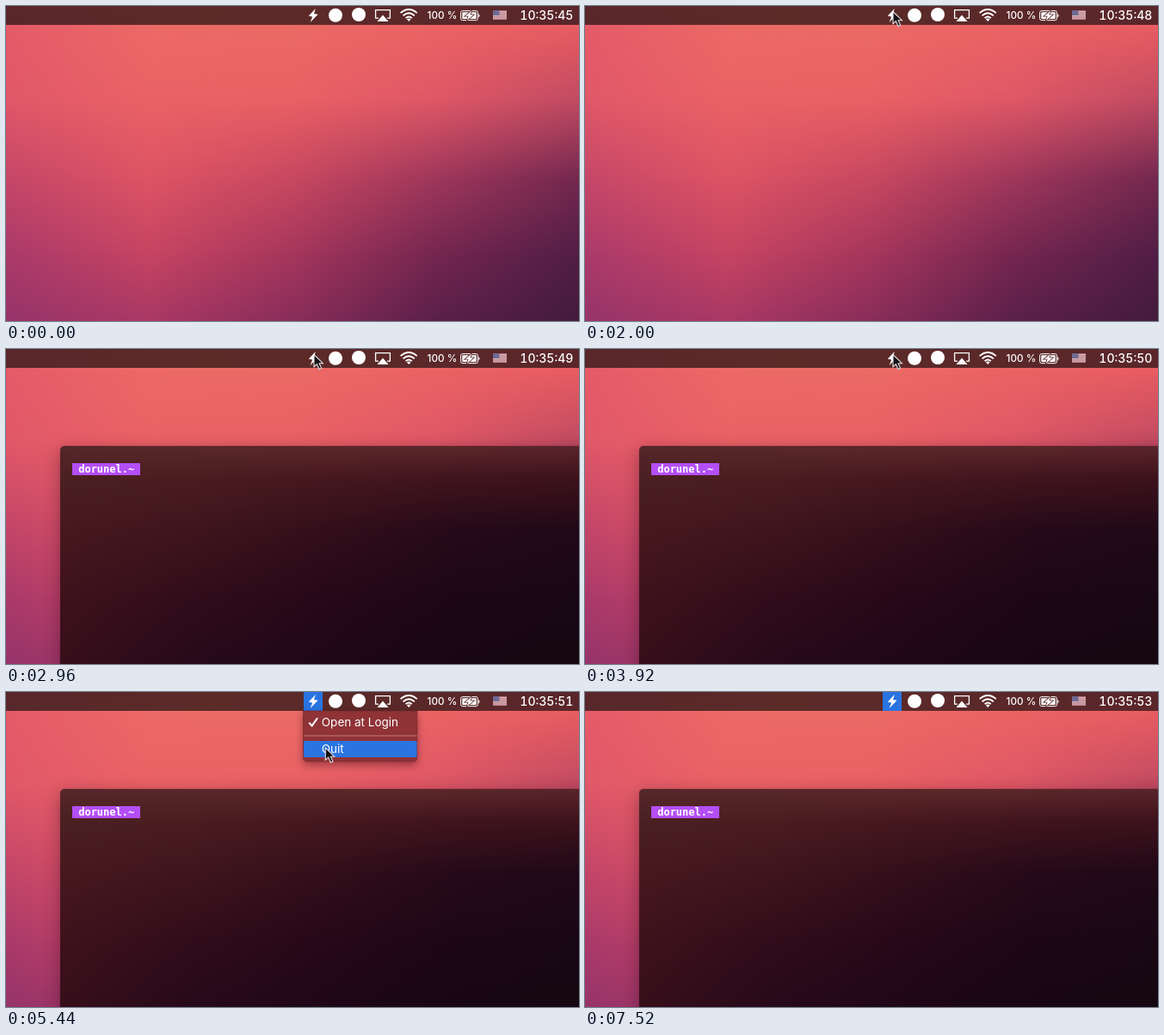
Recreate the animation shown at these times as an HTML page. Size 666 px wide and 367 px high, loop 7.6 s.

```html
<!DOCTYPE html>
<html lang="en">
<head>
<meta charset="utf-8">
<title>Menu bar terminal</title>
<style>
  html, body { margin: 0; width: 100%; height: 100%; overflow: hidden; background: #a83a60; }
  #stage { position: relative; width: 666px; height: 367px; overflow: hidden; }
  #wall, .band, svg { position: absolute; inset: 0; }
  #window {
    position: absolute; left: 63px; top: 113px; right: -14px; bottom: -20px;
    overflow: hidden; border-radius: 5px;
    box-shadow: 0 5px 20px rgba(40, 0, 20, .36), 0 0 1px rgba(0, 0, 0, .5);
  }
  text { font-family: Inter, Roboto, sans-serif; fill: #fff; white-space: pre; }
  .status { font-weight: 500; }
  .prompt { font: bold 12px "DejaVu Sans Mono", monospace; }
  .item { font-size: 13.5px; }
  .line { fill: none; stroke: #fff; }
  .blue { fill: #2a74e2; }
  #panel { filter: drop-shadow(0 4px 5px rgba(40, 0, 10, .4)); }
</style>
</head>
<body>
<div id="stage">
  <div id="wall"></div>
  <div id="window"></div>
  <svg width="666" height="367" viewBox="0 0 666 367">
    <defs>
      <linearGradient id="barFill">
        <stop offset="0" stop-color="#58272b"/>
        <stop offset=".35" stop-color="#5b2b28"/>
        <stop offset="1" stop-color="#5a262a"/>
      </linearGradient>
    </defs>

    <g id="prompt">
      <rect x="77" y="133" width="79" height="14" fill="#b44ef6"/>
      <text class="prompt" x="84.2" y="144">dorunel.~</text>
      <rect id="caret" x="164" y="133" width="7" height="14" fill="#fff"/>
    </g>

    <rect width="666" height="22" fill="url(#barFill)"/>
    <rect id="active" class="blue" x="346" width="22" height="22"/>

    <g fill="#fff">
      <path d="M359.8 3 351.8 11.6 356.2 12.4 353.6 19 362.6 9.8 358 9Z"/>
      <circle cx="383" cy="10.8" r="8"/>
      <circle cx="410" cy="10" r="8"/>
      <path class="line" stroke-width="1.3" d="M433 14.2H429.6V4.6H446.4V14.2H443"/>
      <path d="M438 10.6 444.6 18H431.4Z"/>
      <g class="line" stroke-width="1.9">
        <path d="M458.6 8.1Q468.2 -.3 477.8 8.1"/>
        <path d="M461.6 11.2Q468.2 5.4 474.8 11.2"/>
        <path d="M464.6 14.1Q468.2 11 471.8 14.1"/>
      </g>
      <path d="M468.2 18 465.8 15.3Q468.2 13.5 470.6 15.3Z"/>
      <rect class="line" x="528.6" y="5.6" width="19.8" height="11" rx="2"/>
      <rect x="530.3" y="7.3" width="16.4" height="7.6" rx=".6"/>
      <path d="M549.4 9Q552 11 549.4 13.4Z"/>
      <path stroke="#5a282a" stroke-width="1.6" paint-order="stroke"
        d="M541.2 5.4 533.8 11.8H537.6L535.6 17 543.4 10.2H539.4Z"/>
    </g>
    <g id="flag">
      <rect x="566" y="5" width="16" height="11" fill="#e9e1e4"/>
      <path stroke="#a8525f" stroke-width=".85"
        d="M566 5.5h16m-16 1.7h16m-16 1.7h16m-16 1.7h16m-16 1.7h16m-16 1.7h16m-16 1.3h16"/>
      <rect x="566" y="5" width="7.5" height="6" fill="#6f6a92"/>
    </g>
    <text class="status" x="489.6" y="15" font-size="11.7">100 %</text>
    <text class="status" id="clock" x="659.3" y="16" font-size="14" text-anchor="end"
      style="font-variant-numeric: tabular-nums"></text>

    <g id="menu">
      <path id="panel" fill="#8f3337" stroke="#6c2429" stroke-width=".6"
        d="M345.5 22H477.8V76Q477.8 80.8 473 80.8H350.3Q345.5 80.8 345.5 76Z"/>
      <rect x="346" y="50" width="131.5" height="2" fill="#a9575a"/>
      <rect id="openRow" class="blue" x="346" y="26" width="131.5" height="19"/>
      <rect id="quitRow" class="blue" x="346" y="57" width="131.5" height="19"/>
      <path class="line" stroke-width="2" d="M352.2 35.6 355.6 39.4 362 30.4"/>
      <text class="item" x="366.8" y="40">Open at Login</text>
      <text class="item" x="366.8" y="71">Quit</text>
    </g>

    <path id="pointer" fill="#151015" stroke="#e6e2e3" stroke-width="1.1"
      d="M0 0V14.2L3.4 11.2 6 17 8.6 15.9 6.1 10.2H10.4Z"/>
  </svg>
</div>
<script>
const LOOP = 7600, STEP = 80;
const $ = id => document.getElementById(id);

// Horizontal gradients, each fading into the next one below it.
function softMesh(parent, rows) {
  rows.forEach(([y, colors], i) => {
    const band = document.createElement('div');
    band.className = 'band';
    const stops = colors.split(' ').map(c => '#' + c).join(',');
    band.style.background = `linear-gradient(90deg, ${stops})`;
    if (i) {
      const mask = `linear-gradient(transparent ${rows[i - 1][0]}px, #000 ${y}px)`;
      band.style.webkitMaskImage = band.style.maskImage = mask;
    }
    parent.append(band);
  });
}

softMesh($('wall'), [
  [22, 'e65a68 ec6a67 eb6b66 ec6364 e95d61'],
  [110, 'e05869 ea6265 e96064 de5766 c04a62'],
  [200, 'c64768 dd5464 c84860 9f375b 74284f'],
  [290, 'aa3a6a c64462 a5365c 742650 511e45'],
  [367, '96346a a83864 882d5a 5a2049 431b3c']
]);
softMesh($('window'), [
  [2, '55272a 59282a 5b272a 59242a'],
  [38, '4b2022 4a1d20 46181e 40141d 3d121c'],
  [97, '47191e 40151d 330f1b 260a19 200917'],
  [177, '3f121c 310d1b 270818 1d0715 190815'],
  [254, '370f1b 270a1a 1f0717 180713 150810']
]);

// time, x, y of the pointer tip
const path = [
  [240, 326, 301], [480, 336, 170], [720, 345, 62], [960, 347, 18],
  [1040, 347, 16], [1400, 352, 9], [1680, 358, 6.5], [4880, 358, 6.5],
  [5120, 362, 34], [5360, 370, 62], [5440, 371.3, 65], [5600, 374, 64],
  [6000, 374, 64], [6080, 375, 72], [6160, 381, 120], [6240, 392, 215],
  [6320, 404, 331], [6400, 412, 400]
];
const ticks = [240, 1040, 2000, 2960, 3920, 4880, 5840, 6800];
const blinks = [2240, 2800, 3360, 3920, 4480, 5040, 5680, 6240, 6800, 7360];

const passed = (times, t) => times.filter(at => at <= t).length;
const show = (id, on) => { $(id).style.visibility = on ? 'visible' : 'hidden'; };

function pointerAt(t) {
  const i = path.findIndex(p => p[0] > t);
  if (i < 1) return null;
  const [t0, x0, y0] = path[i - 1], [t1, x1, y1] = path[i];
  const k = (t - t0) / (t1 - t0);
  return { x: x0 + (x1 - x0) * k, y: y0 + (y1 - y0) * k };
}

function render(time) {
  const t = Math.floor(time % LOOP / STEP) * STEP;
  const tip = pointerAt(t);
  const menuOpen = t >= 4080 && t < 7520;
  const hovers = (top, bottom) => menuOpen && tip !== null && tip.y >= top && tip.y < bottom;

  $('clock').textContent = '10:35:' + (45 + passed(ticks, t));
  show('window', t >= 2080);
  show('prompt', t >= 2240);
  show('caret', passed(blinks, t) % 2 === 1);
  show('active', t >= 4080);
  show('menu', menuOpen);
  show('openRow', hovers(26, 45));
  show('quitRow', hovers(57, 76));
  show('pointer', tip !== null);
  if (tip) $('pointer').setAttribute('transform', `translate(${tip.x} ${tip.y})`);
}

const start = performance.now();
function frame() {
  render(performance.now() - start);
  requestAnimationFrame(frame);
}
frame();
</script>
</body>
</html>
```
